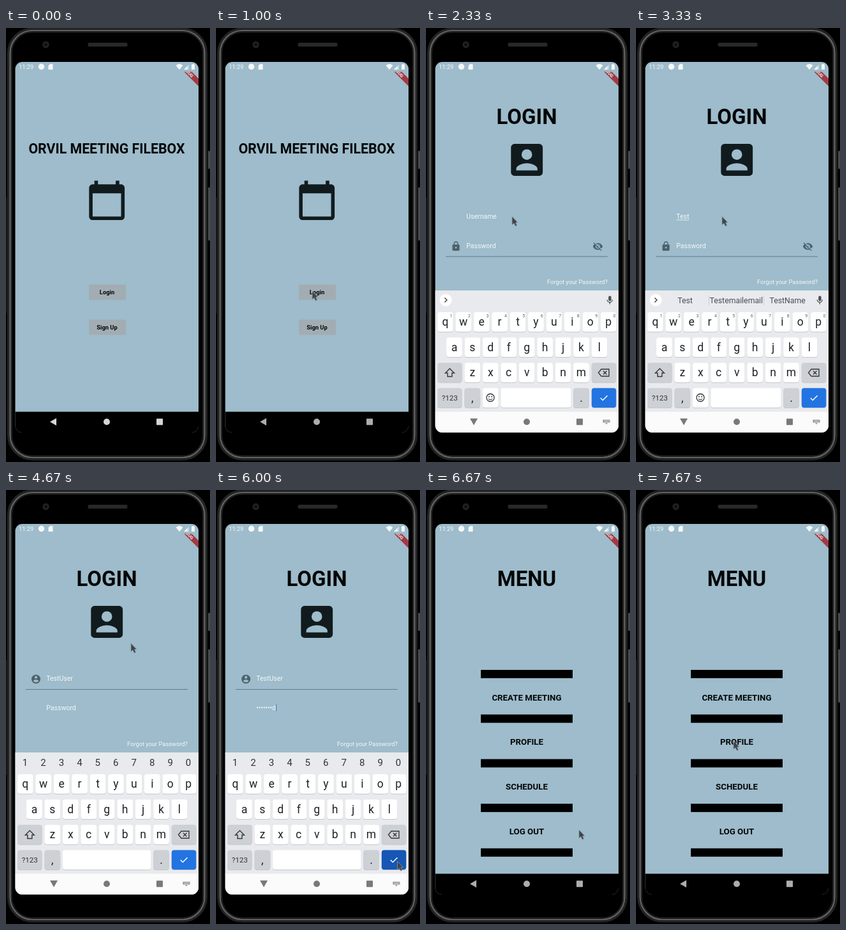
Write an HTML page that moves like this. It is 320 px wide and 678 px high and loops after 8 s.

```html
<!DOCTYPE html>
<html lang="en">
<head>
<meta charset="utf-8">
<title>Sign-in walkthrough</title>
<style>
  html, body { margin: 0; width: 100%; height: 100%; overflow: hidden; background: #000; }
  svg { display: block; width: 320px; height: 678px; font-family: Roboto, "Liberation Sans", sans-serif; }
  .b { font-weight: 700; }
  .mid { text-anchor: middle; }
  .end { text-anchor: end; }
</style>
</head>
<body>
<svg id="stage" viewBox="0 0 320 678" xmlns="http://www.w3.org/2000/svg"></svg>
<script>
const LOOP = 8000;
const INK = '#030607', DARK = '#111b1e', WHITE = '#f4f8fa', SLATE = '#4c626d';
const stage = document.getElementById('stage');

const rect = (x, y, w, h, fill, r = 0, more = '') =>
  `<rect x="${x}" y="${y}" width="${w}" height="${h}" rx="${r}" fill="${fill}" ${more}/>`;
const text = (x, y, size, str, fill, cls = '', more = '') =>
  `<text x="${x}" y="${y}" font-size="${size}" fill="${fill}" class="${cls}" ${more}>${str}</text>`;
const path = (d, fill, more = '') => `<path d="${d}" fill="${fill}" ${more}/>`;
const line = (d, color, width) => path(d, 'none', `stroke="${color}" stroke-width="${width}"`);
const dot = (x, y, r, fill, more = '') => `<circle cx="${x}" cy="${y}" r="${r}" fill="${fill}" ${more}/>`;
// 24-unit icon centred on x, y
const icon = (name, x, y, scale, fill) =>
  path(ICONS[name], fill, `transform="translate(${x} ${y}) scale(${scale}) translate(-12 -12)" fill-rule="evenodd"`);

const ICONS = {
  calendar: 'M20 3h-1V1h-2v2H7V1H5v2H4c-1.1 0-2 .9-2 2v16c0 1.1.9 2 2 2h16c1.1 0 2-.9 2-2V5c0-1.1-.9-2-2-2zm0 18H4V8h16v13z',
  card: 'M3 5v14a2 2 0 0 0 2 2h14a2 2 0 0 0 2-2V5a2 2 0 0 0-2-2H5a2 2 0 0 0-2 2zM15 9a3 3 0 0 1-6 0a3 3 0 0 1 6 0zM6 17c0-2 4-3.1 6-3.1s6 1.1 6 3.1v1H6z',
  user: 'M12 2a10 10 0 0 0 0 20a10 10 0 0 0 0-20zM12 5a3 3 0 0 1 0 6a3 3 0 0 1 0-6zM12 19.2a7.2 7.2 0 0 1-6-3.2c0-2 4-3.1 6-3.1s6 1.1 6 3.1a7.2 7.2 0 0 1-6 3.2z',
  lock: 'M18 8h-1V6A5 5 0 0 0 7 6v2H6a2 2 0 0 0-2 2v10a2 2 0 0 0 2 2h12a2 2 0 0 0 2-2V10a2 2 0 0 0-2-2zM12 17a2 2 0 0 1 0-4a2 2 0 0 1 0 4zM8.9 8V6a3.1 3.1 0 0 1 6.2 0v2z',
  eyeOff: 'M12 7a5 5 0 0 1 4.64 6.83l2.92 2.92A11.8 11.8 0 0 0 23 12C21.27 7.6 17 4.5 12 4.5a11.7 11.7 0 0 0-4 .7l2.17 2.16A5 5 0 0 1 12 7zM2 4.27L4.74 7A11.8 11.8 0 0 0 1 12c1.73 4.4 6 7.5 11 7.5 1.55 0 3-.3 4.38-.84L19.73 22 21 20.73 3.27 3zM7.53 9.8l1.55 1.55A3 3 0 0 0 12.65 14.92l1.55 1.55A5 5 0 0 1 7.53 9.8zM11.84 9L15 12.17A3 3 0 0 0 11.84 9z'
};

function phone() {
  const ring = (inset, color, width, r) =>
    rect(inset, inset - 2.5, 318 - 2 * inset, 680 - 2 * inset, 'none', r, `stroke="${color}" stroke-width="${width}"`);
  return `<defs>
      <clipPath id="screen"><rect x="14.5" y="53" width="287.5" height="579" rx="11"/></clipPath>
      <clipPath id="corner"><rect x="260" y="68.5" width="42" height="30"/></clipPath>
    </defs>` +
    rect(0, 0, 320, 678, '#000') +
    rect(317, 192, 3, 28, '#4a4a4a', 1) + rect(317, 249, 3, 83, '#4a4a4a', 1) +
    rect(0, 265, 1.2, 180, '#202020') +
    ring(3.5, '#242424', 3, 38) + ring(6.5, '#606060', 2.6, 35) + ring(9, '#1e1e1e', 2, 32) +
    dot(62.5, 26, 5.2, '#222') + dot(62.5, 26, 2.4, '#0b1016') +
    rect(128.5, 23, 62, 6, '#282828', 2);
}

function statusBar() {
  return text(20, 64, 9.4, '11:29', WHITE) + dot(55.5, 60.5, 4.7, WHITE) +
    path('M69 56.3h4.5v8.7h-7v-6.2z', WHITE) +
    path('M266.5 58.5Q272 53.5 277.5 58.5L272 65.3z', WHITE) +
    path('M279 65L287 57V65z', '#c5d8e1') + path('M279 65L284.5 59.5V65z', WHITE) +
    path('M291 57h1.5v-1h2v1h1.5v8h-5z', WHITE) +
    `<g clip-path="url(#corner)">` +
    path('M269 58L281 58L312 89V101z', '#a13a44') +
    text(0, 2.4, 6.6, 'DEBUG', WHITE, 'b mid', 'transform="translate(285.5 68.5) rotate(45)"') + '</g>';
}

function navBar(s) {
  const c = s.keys ? '#77797c' : s.bright ? '#d6d6d6' : '#adadad';
  let out = rect(14, 599.5, 289, 33, s.keys ? '#fbfbfc' : '#000') +
    path(s.keys ? 'M69 610H81L75 620.5z' : 'M69 615.3L79 609.5V621z', c) +
    dot(158, 615.3, 5, c) + rect(236, 610.3, 10, 10, c, .8);
  if (s.keys || s.ime) {
    const dim = s.keys ? '#8a8c8f' : '#6c6c6c';
    out += rect(277.5, 612, 11, 4.6, dim, .6) + path('M281 617.3h4l-2 2z', dim) +
      line('M279 613.5H287.5M279 615.2H287.5', s.keys ? '#fff' : '#000', .6);
  }
  return out;
}

function home() {
  const button = (y, label) => rect(130, y, 58, 24, '#a2adb3', 1.5) +
    text(158.5, y + 15.2, 9.3, label, INK, 'b mid');
  return text(158, 196, 21.3, 'ORVIL MEETING FILEBOX', INK, 'b mid') +
    icon('calendar', 158.2, 269.3, 2.79, DARK) + button(400.7, 'Login') + button(455.5, 'Sign Up');
}

function field(y, str, mark, lined, id) {
  const hint = id === 'user' ? 'Username' : 'Password';
  return (mark ? icon(mark, 47, y + 1, .7, SLATE) : '') +
    (lined ? rect(31, y + 16.5, 254, 1, '#60798a') : '') +
    text(63.3, y + 3.8, 10.5, str || hint, WHITE, '', `id="${id}"`);
}

function login(s) {
  const onUser = s.focus === 'user', onPass = s.focus === 'pass';
  const pill = (x, label) => rect(x, 556, 96, 26.5, '#a2aeb5', 13.2) +
    text(x + 47.7, 573.8, 13.2, label, INK, 'b mid');
  return text(158, 150, 33, 'LOGIN', INK, 'b mid') +
    icon('card', 158.2, 206, 2.77, DARK) +
    field(294.5, s.user, onUser ? '' : 'user', !onUser || s.ime, 'user') +
    field(340, s.pass, onPass ? '' : 'lock', !onPass, 'pass') +
    (onPass ? '' : icon('eyeOff', 269.5, 341.3, .7, SLATE)) +
    text(285, 399.8, 9.3, 'Forgot your Password?', WHITE, 'end') +
    pill(31, 'CANCEL') + pill(180, 'NEXT');
}

function menu() {
  const labels = ['CREATE MEETING', 'PROFILE', 'SCHEDULE', 'LOG OUT'];
  let out = text(158, 150, 33, 'MENU', INK, 'b mid');
  for (let i = 0; i < 5; i++) {
    out += rect(86, 281 + i * 69.7, 144, 13, '#000');
    if (labels[i]) out += text(158, 328.6 + i * 69.7, 13.3, labels[i], INK, 'b mid');
  }
  return out;
}

function key(x, y, w, label, fill = '#fff', size = 17.5) {
  return rect(x, y + 1, w, 30.5, '#c3c6cb', 4) + rect(x, y, w, 30.5, fill, 4) +
    text(x + w / 2, y + 21, size, label, '#202124', 'mid');
}

function keyboard(s) {
  const pass = s.focus === 'pass', grey = '#cdd0d5', pitch = 28.45;
  let out = rect(14, 410, 289, 190, '#e8eaee');
  const letters = (str, x0, y) => [...str].forEach((ch, i) => { out += key(x0 + i * pitch, y, 24.8, ch); });
  letters('qwertyuiop', 17.8, 444);
  letters('asdfghjkl', 32, 483.5);
  letters('zxcvbnm', 60.4, 523);
  for (let i = 0; i < 10; i++) {
    const n = (i + 1) % 10;
    out += pass ? text(30 + i * pitch, 431, 15, n, '#303236', 'mid')
                : text(39.5 + i * pitch, 452, 7, n, '#5f6368', 'mid');
  }
  if (!pass) {
    out += dot(31, 425, 9.5, '#fff') + line('M29.3 421.5L32.8 425L29.3 428.5', '#444', 1.4) +
      rect(286.2, 418.5, 4.4, 8, '#4b4e52', 2.2) +
      line('M284.3 424.5a4 4 0 0 0 8 0M288.3 428.5V431.5', '#4b4e52', 1.3);
    if (s.words) {
      s.words.forEach((w, i) => { out += text(77 + i * 80.3, 429.8, 12.3, w, '#4a4d51', 'mid'); });
      out += rect(114, 418, .8, 15, '#c4c7cc') + rect(200, 418, .8, 15, '#c4c7cc');
    }
  }
  out += key(18, 523, 38.5, '', grey) + line('M37.3 532L44.3 539H40.8V544.5H33.8V539H30.3Z', '#35383c', 1.4) +
    key(259.8, 523, 38.5, '', grey) +
    line('M270.5 538.5L275 533H287V544H275ZM278 535.8L283.5 541.3M283.5 535.8L278 541.3', '#35383c', 1.4) +
    key(18, 562.5, 38.5, '', grey) + text(37.2, 582.3, 11.6, '?123', '#303236', 'mid') +
    key(60.4, 562.5, 24.8, ',', grey) + key(231.1, 562.5, 24.8, '.', grey);
  if (pass) out += key(88.8, 562.5, 138.7, '');
  else {
    out += key(88.8, 562.5, 24.8, '') + key(117.3, 562.5, 110.2, '') +
      dot(101, 577.5, 6, 'none', 'stroke="#303236" stroke-width="1.3"') +
      dot(98.9, 576, .9, '#303236') + dot(103.1, 576, .9, '#303236') +
      line('M98 579a3.4 3.4 0 0 0 6 0', '#303236', 1.1);
  }
  return out + key(259.8, 562.5, 38.5, '', s.press ? '#1656b4' : '#2274e2') +
    line('M273.8 578L277.3 581.5L284.5 574.2', '#fff', 1.5);
}

function pointer([x, y]) {
  return path('M0 0V13L2.9 10.6L5.2 15L7.6 13.9L5.6 9.6L8.8 9.2Z', '#3f4548',
    `transform="translate(${x} ${y})" stroke="#8b9ba3" stroke-width=".8" stroke-linejoin="round"`);
}

// Each step keeps what came before and changes only what it names.
const STEPS = [
  [0, { page: home, bright: 1 }],
  [330, { bright: 0, at: [304, 186] }],
  [670, { at: [156, 421] }],
  [1000, { at: [151, 411] }],
  [1670, { page: login }],
  [2000, { focus: 'user', ime: 1, caret: 1, at: [135, 294.5] }],
  [2330, { keys: 1, ime: 0, caret: 0 }],
  [2670, { user: 'T', caret: 1, words: ['T', 'The', 'Test'] }],
  [3000, { user: 'Test', words: ['Test', 'Testemailemail', 'TestName'] }],
  [3330, { caret: 0 }],
  [3670, { user: 'TestUs', caret: 1, words: ['TestUs', 'Testis', 'Tests'] }],
  [4000, { user: 'TestUser', words: ['TestUser', 'Test user', 'Test users'] }],
  [4330, { focus: 'pass', at: [200, 337] }],
  [4670, { caret: 0, at: [196, 239.5] }],
  [5000, { pass: '••s', caret: 1 }],
  [5330, { pass: '••••••r' }],
  [5670, { pass: '•••••••d', caret: 0, at: [190, 638] }],
  [6000, { caret: 1, press: 1, at: [284.5, 580] }],
  [6330, { pass: '••••••••', focus: '', keys: 0, caret: 0, press: 0, at: [268, 573.5] }],
  [6670, { page: menu, at: [240, 531] }],
  [7000, { at: [192, 521] }],
  [7330, { at: [190, 450] }],
  [7670, { at: [153, 392] }]
];

const states = [];
STEPS.reduce((prev, [, change]) => {
  const next = { ...prev, ...change };
  states.push(next);
  return next;
}, {});

function addCaret(s) {
  const el = document.getElementById(s.focus);
  const typed = s[s.focus];
  const width = typed ? el.getComputedTextLength() : 0;
  const y = s.focus === 'user' ? 289 : 334.5;
  let extra = '';
  if (s.caret) extra += rect(63.3 + width, y, 1, 11, '#3c7fc4');
  if (s.focus === 'user' && typed) extra += rect(63.3, 299.6, width, .8, WHITE);
  el.insertAdjacentHTML('afterend', extra);
}

function draw(s) {
  stage.innerHTML = phone() + '<g clip-path="url(#screen)">' +
    rect(14, 52, 289, 581, '#9ebccb') + s.page(s) + statusBar() +
    (s.keys ? keyboard(s) : '') + navBar(s) + '</g>' +
    (s.at ? pointer(s.at) : '');
  if (s.focus) addCaret(s);
}

let shown = -1;
function tick() {
  const t = performance.now() % LOOP;
  let i = STEPS.length - 1;
  while (STEPS[i][0] > t) i--;
  if (i !== shown) draw(states[shown = i]);
  requestAnimationFrame(tick);
}
tick();
</script>
</body>
</html>
```
